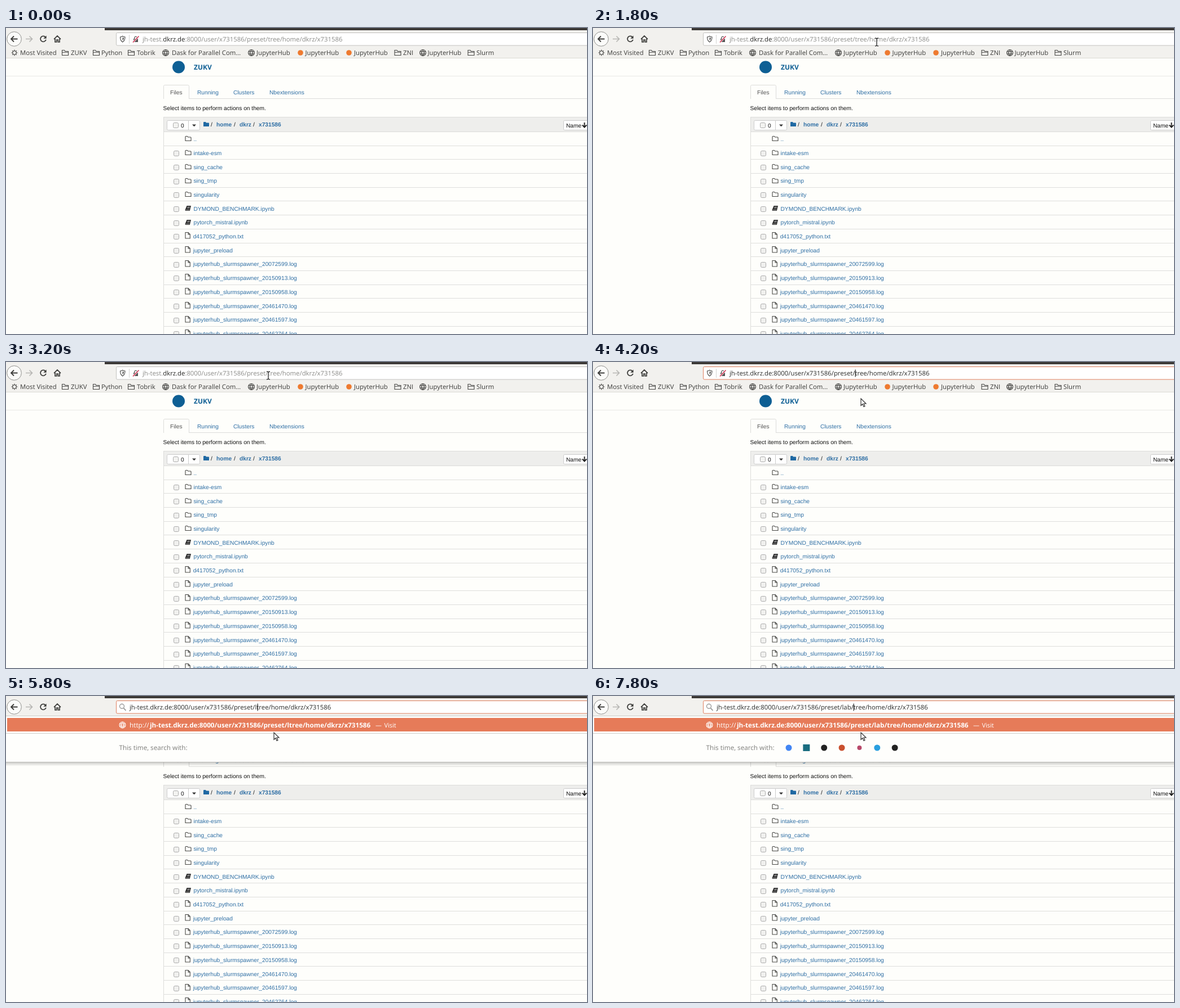
Write an HTML page that moves like this. It is 1030 px wide and 544 px high and loops after 8000 ms.

```html
<!DOCTYPE html>
<html lang="en">
<head>
<meta charset="utf-8">
<title>File browser</title>
<style>
html, body { margin: 0; width: 100%; height: 100%; overflow: hidden; background: #fefefb; }
svg { display: block; width: 1030px; height: 544px; }
text { font: 10.2px "Liberation Sans", Arial, sans-serif; fill: #111; text-rendering: geometricPrecision; white-space: pre; }
.ui { font: 11.33px "Open Sans", "Noto Sans", sans-serif; fill: #3c3c3a; }
.link { fill: #2f6fa5; }
.bold { font-weight: bold; }
.dim { fill: #8b8b88; }
.line { fill: none; stroke: #464644; stroke-width: 1.1; }
</style>
</head>
<body>
<svg id="stage" viewBox="0 0 1030 544"></svg>
<script>
const LOOP = 8000;
const USER = 'x731586';
const HOST = 'jh-test.dkrz.de';
const BASE = `:8000/user/${USER}/preset/`;
const TAIL = `tree/home/dkrz/${USER}`;

const rect = (x, y, w, h, fill, more = '') =>
  `<rect x="${x}" y="${y}" width="${w}" height="${h}" fill="${fill}" ${more}/>`;
const box = (x, y, w, h, fill, stroke, r = 0) =>
  rect(x + .5, y + .5, w - 1, h - 1, fill, `stroke="${stroke}" rx="${r}"`);
const dot = (x, y, r, fill) => `<circle cx="${x}" cy="${y}" r="${r}" fill="${fill}"/>`;
const path = (d, more = 'class="line"') => `<path d="${d}" ${more}/>`;
const text = (x, y, s, cls = '', more = '') => `<text x="${x}" y="${y}" class="${cls}" ${more}>${s}</text>`;
const move = (x, y, s) => `<g transform="translate(${x} ${y})">${s}</g>`;
const group = (id, s) => `<g id="${id}">${s}</g>`;

const icons = {
  folder: path('M.5 8.5V1.5Q.5.5 1.5.5H4L5.2 2H9.5Q10.5 2 10.5 3V8.5Z'),
  wide: path('M.5 9.5V.5H4.5L6 2.5H11.5V9.5ZM.5 4.3H11.5'),
  file: path('M.5.5H5.6L8.8 3.7V11H.5ZM5.5.7V3.9H8.6'),
  book: path('M3 0H10.5L8.3 9H1Q-.4 8.6 .2 7Z', 'fill="#2f2f2f"') +
    path('M4 2.3H8.5M3.6 4H8M1.3 7.6H7.8', 'stroke="#ddd" stroke-width=".7"'),
  globe: path('M-5.5 0A5.5 5.5 0 1 1 5.5 0A5.5 5.5 0 1 1-5.5 0ZM-5 -1.9H5M-5 1.9H5M0-5.5Q-5 0 0 5.5Q5 0 0-5.5Z', 'fill="none" stroke="currentColor" stroke-width="1.1"'),
  gear: '<circle r="3.2" class="line" stroke-width="1.6"/>' +
    path('M0-5.4V-3M0 3V5.4M-5.4 0H-3M3 0H5.4M-3.8-3.8L-2.1-2.1M2.1 2.1L3.8 3.8M-3.8 3.8L-2.1 2.1M2.1-2.1L3.8-3.8'),
  disc: dot(0, 0, 4.8, '#ee7a30')
};
const icon = (name, x, y) => move(x, y, icons[name]);

function toolbar() {
  const marks = [
    ['gear', 15, 'Most Visited', 25], ['wide', 99, 'ZUKV', 115], ['wide', 154, 'Python', 169],
    ['wide', 216, 'Tobrik', 232], ['globe', 283, 'Dask for Parallel Com…', 294],
    ['globe', 435, 'JupyterHub', 444], ['disc', 522, 'JupyterHub', 530.5],
    ['disc', 608, 'JupyterHub', 617], ['wide', 688.5, 'ZNI', 704],
    ['globe', 739, 'JupyterHub', 747.5], ['wide', 818.5, 'Slurm', 834]
  ];
  return rect(0, 0, 1030, 53, '#f2f1ee') + rect(175, 0, 855, 4, '#3b3836') +
    rect(0, 53, 1030, 1, '#dbdad6') +
    '<circle cx="14.5" cy="19.5" r="12.8" fill="#fbfbf9" stroke="#8e8e8b"/>' +
    path('M20.5 19.5H9M14 14.5L9 19.5L14 24.5', 'fill="none" stroke="#3c3c3a" stroke-width="1.8"') +
    path('M35 19.5H46.5M41.5 14.5L46.5 19.5L41.5 24.5', 'fill="none" stroke="#b7b6b3" stroke-width="1.6"') +
    path('M70 16.2A5 5 0 1 0 70.9 20.8', 'fill="none" stroke="#3c3c3a" stroke-width="1.8"') +
    path('M71.6 13.5V18.7H66.4Z', 'fill="#3c3c3a"') +
    path('M85 19.8L91 14L97 19.8M87 19V25H89.7V21H92.3V25H95V19', 'fill="none" stroke="#3c3c3a" stroke-width="1.7"') +
    group('mark-hover', rect(6, 36, 86, 16, '#dddcd8', 'rx="2"')) +
    marks.map(([name, x, label, tx]) =>
      icon(name, x, name === 'wide' ? 39 : 44) + text(tx, 48, label, 'ui')).join('');
}

function urlBar() {
  return '<rect id="field" x="195.5" y="8.5" width="850" height="22.5" rx="2" fill="#fff"/>' +
    group('site', path('M202.5 16Q205 15.8 206.7 14.5Q208.5 15.8 211 16Q211 22.5 206.7 25Q202.5 22.5 202.5 16Z') +
      path('M206.7 17V22.5Q209 21 209 17.6Z', 'fill="#464644"') +
      rect(218, 12, 1, 16, '#d4d4d1') +
      rect(226, 19, 8, 6, '#555') + path('M227.7 19V17Q230 13 232.3 17V19') +
      path('M225 25.5L235.5 14.5', 'stroke="#fff" stroke-width="3"') +
      path('M225 25.5L235.5 14.5', 'stroke="#d02c4c" stroke-width="1.5"')) +
    group('lens', '<circle cx="205.5" cy="18.3" r="4" fill="none" stroke="#999" stroke-width="1.4"/>' +
      path('M208.4 21.4L212.5 25.8', 'stroke="#999" stroke-width="1.7"')) +
    text(242, 24, `jh-test.<tspan fill="#252523">dkrz.de</tspan>${BASE}${TAIL}`, 'ui dim', 'id="idle"') +
    text(219, 24, '', 'ui', 'id="typed" style="fill:#2b2b29"') +
    '<rect id="caret" y="13.5" width="1.1" height="13" fill="#111"/>';
}

function header() {
  const tabs = [['Running', 339], ['Clusters', 403], ['Nbextensions', 467]];
  return rect(0, 85, 1030, 1, '#e7e7e5') + dot(306, 69.5, 11, '#0e5f94') +
    text(333, 74, 'ZUKV', 'ui bold', 'style="font-size:12px;fill:#0e5f94"') +
    rect(279, 125, 751, 1, '#dcdcda') +
    path('M279.5 126V103.5Q279.5 101.5 281.5 101.5H322.5Q324.5 101.5 324.5 103.5V126', 'fill="#fefefb" stroke="#dcdcda"') +
    group('tab-hover', rect(391, 101, 62, 24, '#ececea', 'rx="2"')) +
    text(291, 118, 'Files', '', 'style="fill:#555"') +
    tabs.map(([s, x]) => text(x, 118, s, 'link')).join('') +
    text(278.5, 146, 'Select items to perform actions on them.');
}

function listHead() {
  const crumbs = [['home', 373, 363], ['dkrz', 414, 404], [USER, 448, 438]];
  return box(279, 158, 760, 27, '#eeeeec', '#dcdcda') +
    box(285, 164, 59, 18, '#fff', '#ccc', 2) + rect(323, 164, 1, 18, '#ccc') +
    box(296, 168, 10, 10, '#f3f3f1', '#aaa', 2) + text(310, 177, '0') +
    path('M330 171.5H337L333.5 175.3Z', 'fill="#333"') +
    path('M350 175V168Q350 167 351 167H354L355 168.4H359Q360 168.4 360 169.4V175Z', 'fill="#1f69a3"') +
    crumbs.map(([s, x, slash]) => text(slash, 175, '/') + text(x, 175, s, 'link bold')).join('') +
    box(988, 164, 60, 18, '#fff', '#ccc', 2) + text(993, 177, 'Name') +
    path('M1025.5 168V176M1021.7 172.5L1025.5 176.5L1029.3 172.5', 'fill="none" stroke="#222" stroke-width="1.9"');
}

function list() {
  const logs = [20072599, 20150913, 20150958, 20461470, 20461597, 20462764];
  const rows = ['..', 'intake-esm', 'sing_cache', 'sing_tmp', 'singularity',
    'DYMOND_BENCHMARK.ipynb', 'pytorch_mistral.ipynb', 'd417052_python.txt', 'jupyter_preload',
    ...logs.map(n => `jupyterhub_slurmspawner_${n}.log`)];
  return rect(279, 184, 1, 360, '#dcdcda') + rows.map((name, i) => {
    const y = 184.4 + 24.7 * i, top = Math.round(y);
    const kind = i < 5 ? 'folder' : i < 7 ? 'book' : 'file';
    return (i ? rect(279, Math.floor(y), 751, 1, '#dededc') + box(297, top + 9, 10, 10, '#f0f0ee', '#aaa', 2) : '') +
      icon(kind, 317.5, top + (kind === 'file' ? 6 : 8)) +
      text(i < 7 ? 332.5 : 331.7, (y + 16.7).toFixed(1), name, 'link');
  }).join('');
}

function dropdown() {
  const engines = ['#4285f4', '#1a6d80', '#222', '#c9502f', '#b8486a', '#2a9fe0', '#222'];
  return '<defs><linearGradient id="shade" x2="0" y2="1"><stop stop-color="#000" stop-opacity=".22"/>' +
    '<stop offset="1" stop-color="#000" stop-opacity="0"/></linearGradient></defs>' +
    rect(0, 117, 1030, 8, 'url(#shade)') + rect(0, 36, 1030, 81, '#fefefc') +
    rect(0, 35, 1030, 1, '#c9c8c5') + rect(0, 117, 1030, 1, '#bdbcb9') +
    rect(2, 39, 1028, 24, '#e67b59') + rect(0, 66, 1030, 1, '#cfcfcc') +
    `<g color="#fff">${icon('globe', 206.5, 51.5)}</g>` +
    text(219, 55.5, 'http://', 'ui', 'style="fill:#fff;font-size:11.8px"') +
    text(255, 55.5, '', 'ui bold', 'id="match" style="fill:#fff;font-size:11.7px"') +
    text(0, 55.5, '—<tspan dx="4.5">Visit</tspan>', 'ui', 'id="visit" style="fill:#fff;font-size:11px"') +
    text(200.5, 96, 'This time, search with:', 'ui', 'style="fill:#7d7d7a;font-size:11.7px"') +
    group('engines', engines.map((c, i) => {
      const x = 347 + 31.35 * i;
      return i === 1 ? rect(x - 6, 86, 12, 12, c) : dot(x, 92, i === 4 ? 4 : 5.5, c);
    }).join(''));
}

const pointers =
  group('arrow', path('M0 0V12.5L2.9 9.8L5 14.6L7 13.7L5 9H9Z', 'fill="#fff" stroke="#222" stroke-width="1.1"')) +
  group('hand', path('M-1.2 8V1.2Q0-.6 1.2 1.2V5L6.8 6Q8 6.4 7.8 8L6.6 13H-.4L-4.4 8.6Q-4 6.6-2.6 7.4Z', 'fill="#fff" stroke="#222" stroke-width="1.1"') +
    path('M3 5.6V8M5 6V8.2', 'stroke="#222" stroke-width=".8"')) +
  group('beam', ['#fff" stroke-width="3.2', '#222" stroke-width="1.3'].map(s =>
    path('M-3-7Q0-7 0-5.5Q0-7 3-7M0-5.5V5.5M-3 7Q0 7 0 5.5Q0 7 3 7', `fill="none" stroke="${s}"`)).join(''));

document.getElementById('stage').innerHTML =
  rect(0, 0, 1030, 544, '#fefefb') + header() + listHead() + list() +
  `<g color="#464644">${toolbar()}</g>` + urlBar() + group('drop', dropdown()) + group('pointer', pointers);

const el = id => document.getElementById(id);
const show = (id, on) => el(id).setAttribute('visibility', on ? 'inherit' : 'hidden');
const set = (id, name, value) => el(id).setAttribute(name, value);

// time, x, y, shape; each pose holds until the next
const trail = [
  [0, 0, 0, ''], [800, 60, 24, 'arrow'], [1000, 130, 52, 'arrow'], [1100, 290, 98, 'arrow'],
  [1200, 418, 118, 'hand'], [1300, 374, 132.5, 'hand'], [1400, 386, 134, 'hand'],
  [1500, 424, 106, 'hand'], [1600, 458, 72, 'arrow'], [1700, 484, 42, 'arrow'],
  [1800, 503, 25, 'beam'], [1900, 492, 24.5, 'beam'], [2000, 480, 24, 'beam'],
  [2100, 490, 24, 'beam'], [2200, 508, 24.5, 'beam'], [2300, 520, 25, 'beam'],
  [2600, 506, 25, 'beam'], [2700, 489, 26, 'beam'], [2800, 478, 27, 'beam'],
  [2900, 470, 27, 'beam'], [3000, 465, 26, 'beam'], [3100, 464, 25, 'beam'],
  [3200, 465, 24, 'beam'], [3900, 465, 26, 'beam'], [4000, 468, 42, 'arrow'],
  [4100, 473, 58, 'arrow'], [4200, 475, 65, 'arrow']
];
// time, typed part, caret x, x of the dash
const typing = [[0, '', 464.6, 0], [5800, 'l', 445.6, 655], [6400, 'la', 452, 662],
  [6600, 'lab', 458, 669], [7800, 'lab/', 461.6, 674]];
const caretOn = [[3900, 5500], [5800, 6200], [6400, 7400], [7800, LOOP]];

const at = (steps, t) => steps.findLast(s => s[0] <= t);
const within = (t, a, b) => t >= a && t < b;

function draw() {
  const t = performance.now() % LOOP;
  const [, x, y, shape] = at(trail, t);
  const [, part, caretX, dashX] = at(typing, t);
  const focused = t >= 3900, open = part !== '';
  const url = HOST + BASE + part + TAIL;

  set('pointer', 'transform', `translate(${x} ${y})`);
  for (const id of ['arrow', 'hand', 'beam']) show(id, id === shape);
  show('mark-hover', within(t, 800, 1000));
  show('tab-hover', within(t, 1200, 1400));

  set('field', 'stroke', focused ? '#e0805f' : '#c3c2bf');
  show('site', !open);
  show('lens', open);
  show('idle', !focused);
  show('typed', focused);
  set('typed', 'x', open ? 219 : 242);
  el('typed').textContent = url;
  set('caret', 'x', caretX);
  show('caret', caretOn.some(([a, b]) => within(t, a, b)));

  show('drop', open);
  show('engines', t >= 6000);
  el('match').textContent = url;
  set('visit', 'x', dashX);
  requestAnimationFrame(draw);
}
draw();
</script>
</body>
</html>
```
